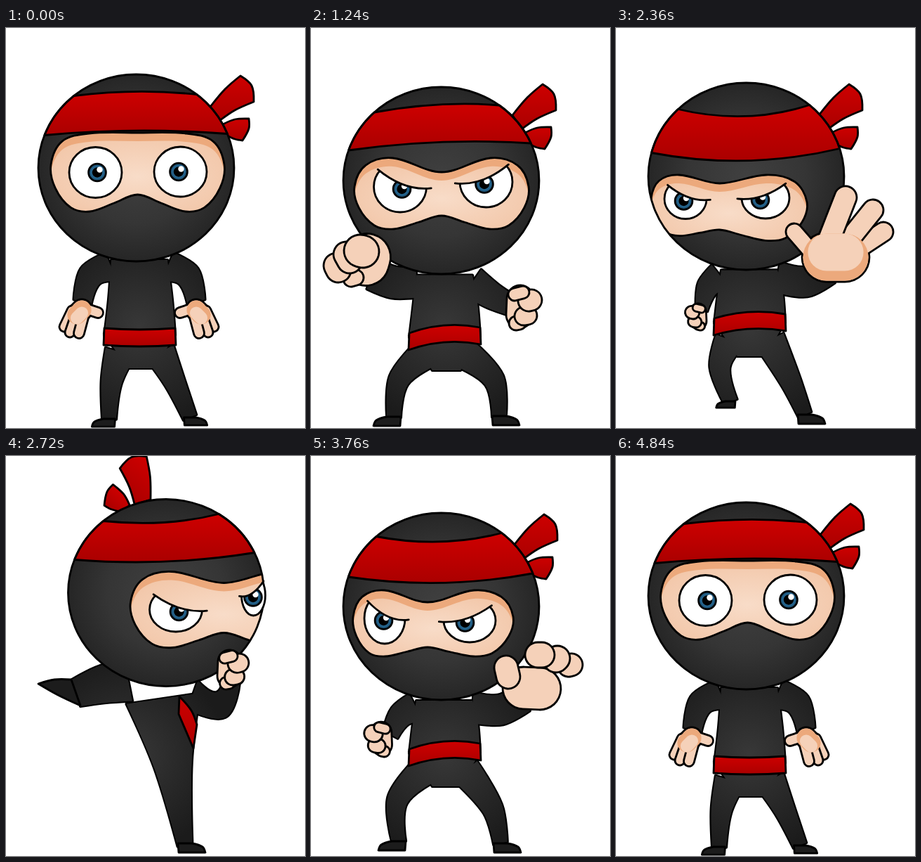
An HTML page that plays this animation: 426 px wide and 569 px high, repeating every 6000 ms.

```html
<!DOCTYPE html>
<html lang="en">
<head>
<meta charset="utf-8">
<title>Ninja moves</title>
<style>
html, body { margin: 0; width: 100%; height: 100%; overflow: hidden; background: #fff; }
svg { display: block; width: 100%; height: 100%; stroke-linejoin: round; stroke-linecap: round; }
.ink { stroke: #000; stroke-width: 2.8; vector-effect: non-scaling-stroke; }
</style>
</head>
<body>
<svg viewBox="0 0 426 569">
  <defs>
    <radialGradient id="hood" cx=".5" cy=".5" r=".6"><stop offset="0" stop-color="#404040"/><stop offset=".5" stop-color="#353535"/><stop offset="1" stop-color="#1e1e1e"/></radialGradient>
    <radialGradient id="suit" gradientUnits="userSpaceOnUse" cx="190" cy="425" r="140"><stop offset="0" stop-color="#383838"/><stop offset="1" stop-color="#1b1b1b"/></radialGradient>
    <linearGradient id="red" x2="0" y2="1"><stop offset="0" stop-color="#ce0000"/><stop offset="1" stop-color="#aa0000"/></linearGradient>
    <radialGradient id="skin" cx=".5" cy=".45" r=".6"><stop offset="0" stop-color="#f8dcc8"/><stop offset="1" stop-color="#f2c6a8"/></radialGradient>
    <radialGradient id="iris"><stop offset=".4" stop-color="#2f77a5"/><stop offset="1" stop-color="#174a6c"/></radialGradient>
    <clipPath id="skullClip"><ellipse cx="185.5" cy="199" rx="139.5" ry="133"/></clipPath>
  </defs>
  <g id="stage"></g>
</svg>
<script>
const SUIT = 'url(#suit)', RED = 'url(#red)', SKIN = '#f5d1b9', SHADE = '#eca97c';

// Closed curve through [x, y, corner] points.
function curve(points) {
  const n = points.length, at = i => points[(i + n) % n];
  const handle = (i, len) => {
    const a = at(i - 1), b = at(i + 1), k = len / (Math.hypot(b[0] - a[0], b[1] - a[1]) || 1);
    return [(b[0] - a[0]) * k, (b[1] - a[1]) * k];
  };
  let d = 'M' + at(0).slice(0, 2);
  for (let i = 0; i < n; i++) {
    const a = at(i), b = at(i + 1), len = Math.hypot(b[0] - a[0], b[1] - a[1]) / 3;
    const ta = a[2] ? [0, 0] : handle(i, len), tb = b[2] ? [0, 0] : handle(i + 1, len);
    d += `C${a[0] + ta[0]} ${a[1] + ta[1]} ${b[0] - tb[0]} ${b[1] - tb[1]} ${b[0]} ${b[1]}`;
  }
  return d + 'Z';
}
// "x,y" is smooth, "!x,y" a corner.
const outline = s => curve(s.split(' ').map(p => [...p.replace('!', '').split(',').map(Number), p[0] === '!']));

const shape = (d, fill) => `<path class="ink" fill="${fill}" d="${d}"/>`;
const group = (transform, inner) => `<g transform="${transform}">${inner}</g>`;
const clip = (id, inner) => `<g clip-path="url(#${id})">${inner}</g>`;
const ellipse = (x, y, rx, ry, attrs) => `<ellipse cx="${x}" cy="${y}" rx="${rx}" ry="${ry}" ${attrs}/>`;

function mix(a, b, k) {
  if (typeof a === 'number') return a + (b - a) * k;
  if (Array.isArray(a)) return typeof a[0] === 'string' && a[0] !== b[0] ? (k < 0.5 ? a : b) : a.map((v, i) => mix(v, b[i], k));
  if (typeof a === 'object') return Object.fromEntries(Object.keys(a).map(key => [key, mix(a[key], b[key], k)]));
  return k < 0.5 ? a : b;
}

// Tapered tube along [x, y, width] joints.
function limb(...joints) {
  const rail = side => joints.map(([x, y, w], i) => {
    const a = joints[Math.max(i - 1, 0)], b = joints[Math.min(i + 1, joints.length - 1)];
    const dx = b[0] - a[0], dy = b[1] - a[1], k = side * w / 2 / Math.hypot(dx, dy);
    return [x - dy * k, y + dx * k, i === 0 || i === joints.length - 1];
  });
  return curve([...rail(1), ...rail(-1).reverse()]);
}
// Several shapes fused under one outline.
function fuse(parts) {
  const paths = parts.map(d => `<path d="${d}"/>`).join('');
  return `<g stroke="#000" stroke-width="4.2">${paths}</g><g fill="${SUIT}">${paths}</g>`;
}

// Head: features are placed on one skull ellipse.
const skull = { x: 185.5, y: 199, rx: 139.5, ry: 133 };
const skullEllipse = attrs => ellipse(skull.x, skull.y, skull.rx, skull.ry, attrs);
const rim = (y, side) => [skull.x + side * skull.rx * Math.sqrt(1 - ((y - skull.y) / skull.ry) ** 2), y];
const ribbons = ['!-6,-10 15,-35 !37,-54 53,-40 !56,-17 29,-5 !7,10', '!12,15 29,8 !49,7 49,21 !40,38 29,36 !16,30'].map(outline);

function headband([y, sag, tilt, h]) {
  const arc = `A${skull.rx} ${skull.ry} 0 0 `;
  const low = y + h;
  return `M${rim(y + tilt, -1)}Q${skull.x} ${y + 2 * sag} ${rim(y - tilt, 1)}` +
    `${arc}1 ${rim(low - tilt, 1)}Q${skull.x} ${low + 2.2 * sag} ${rim(low + tilt, -1)}${arc}1 ${rim(y + tilt, -1)}Z`;
}

function opening([cx, w, brow, dip, nose, cheek, turn, tilt]) {
  const h = cheek - brow, fn = (nose - brow) / h;
  const half = [[0, (dip - brow) / h], [.56, 0], [.87, .1], [1, .4], [.95, .7], [.77, .95], [.55, 1], [.27, (1 + fn) / 2], [0, fn]];
  const other = half.slice(1, -1).reverse().map(([u, f]) => [-u, f]);
  return curve([...half, ...other].map(([u, f]) => [cx + w * (u + turn * (1 - u * u)), brow + h * f + tilt * u * f]));
}

function eye(side, [x, y, rx, ry], gaze, frown) {
  const lift = (1 - frown) * ry, ix = x + gaze - side * 2.5, iy = y + 3 * frown;
  const x1 = x + side * rx * .85, y1 = y - ry * .69 - lift;
  const x2 = x - side * rx * 1.18, y2 = y + ry * .05 - lift;
  const lid = `M${x1} ${y1}Q${(x1 + x2) / 2} ${(y1 + y2) / 2 + ry * .5} ${x2} ${y2}`;
  const id = 'eye' + side;
  const under = `${lid}V${y + 90}H${x + side * 90}V${y1}Z`;
  const ball = ellipse(ix, iy, 12.4, 12.4, 'class="ink" fill="url(#iris)"') + ellipse(ix, iy, 7.2, 7.2, '') +
    ellipse(ix + 3.5, iy - 4, 4.2, 4.2, 'fill="#fff"');
  return `<clipPath id="${id}">${ellipse(x, y, rx, ry, '')}</clipPath><clipPath id="${id}lid"><path d="${under}"/></clipPath>` +
    clip(id + 'lid', ellipse(x, y, rx, ry, 'fill="#fff"') + clip(id, ball) + ellipse(x, y, rx, ry, 'class="ink" fill="none"')) +
    (frown > .2 ? shape(lid, 'none') : '');
}

function headOf([x, y], look) {
  const face = opening(look.face), [kx, ky, turn, flip] = look.knot;
  const skin = `<path d="${face}" fill="${SHADE}"/><clipPath id="faceClip"><path d="${face}"/></clipPath>` +
    clip('faceClip', group('translate(0 12)', `<path d="${face}" fill="url(#skin)"/>`)) + shape(face, 'none');
  return group(`translate(${x} ${y})`,
    group(`translate(${kx} ${ky}) rotate(${turn}) scale(1 ${flip})`, ribbons.map(d => shape(d, RED)).reverse().join('')) +
    skullEllipse('fill="url(#hood)"') + shape(headband(look.band), RED) + clip('skullClip', skin) +
    skullEllipse('class="ink" fill="none"') +
    eye(-1, look.left, look.gaze, look.frown) + eye(1, look.right, look.gaze, look.frown));
}

// band: y, sag, tilt, height; face: centre, half width, brow, dip, nose, cheek, turn, tilt; eyes: centre, radii.
const calm = {
  knot: [297, 122, 0, 1], band: [95.5, -5, 1, 56], face: [187.5, 123.5, 150, 149, 237, 261, 0, 0],
  left: [127.5, 205.5, 37.5, 36], right: [248.5, 204.5, 37.5, 35.5], gaze: 0, frown: 0
};
const angry = {
  knot: [293, 116, 0, 1], band: [97, -6, 5, 54], face: [186, 124, 167, 187, 249, 268, 0, 0],
  left: [127, 208, 37.5, 36], right: [249.5, 201, 37.5, 36], gaze: 0, frown: 1
};
const turned = {
  knot: [295, 122, 0, 1], band: [97, 10, 2.5, 57.5], face: [174, 114, 176, 193, 257, 270, -.07, 0],
  left: [105, 216, 29, 36], right: [226, 219, 37, 31], gaze: -4, frown: 1
};
const bowed = {
  knot: [295, 122, 0, 1], band: [100.5, 13, 3, 62], face: [161, 111, 197, 209, 275, 287, -.12, 6],
  left: [99, 231, 30, 28.5], right: [213, 229.5, 34, 29.5], gaze: -5, frown: 1
};
const aside = {
  knot: [152.5, 70.5, -141, -1], band: [92, 7, 5, 55], face: [268, 133, 169, 185, 256, 277, 0, 0],
  left: [199.5, 223, 37.5, 31.5], right: [310, 202.5, 17, 29], gaze: 2, frown: 1
};

// Hands: a palm and fingers, each a capsule of x1, y1, x2, y2, width.
const hands = {
  open: { side: -1, cover: -9, palm: [0, -13, -7, -6, 30],
    fingers: [[-14, -12, -25, 11, 14], [-7, -10, -17, 19, 14], [4, -10, -4, 20, 15], [8, -14, 23, -9, 15]] },
  fist: { side: -1, palm: [14, -4, 12, 3, 67],
    fingers: [[-9, 27, -2, 25, 22], [-30, 8, -27, 14, 36], [-16, -8, -11, 1, 36], [4, -13, 8, -12, 46]] },
  small: { side: 1, palm: [-5, -13, -6, 10, 38],
    fingers: [[-11, 22, -6, 21, 20], [0, 12, 6, 11, 26], [7, -10, 11, -11, 30], [-13, -19, -1, -22, 18]] },
  palm: { side: 1, cover: 14, palm: [-18, 31, 8, 31, 70],
    fingers: [[25, 20, 63, -5, 28], [7, 15, 48, -36, 30], [-18, 15, 9, -54, 32], [-38, 25, -64, -5, 24]] },
  bent: { side: 1, palm: [-20, 18, 3, 19, 60],
    fingers: [[44, -14, 48, -15, 32], [26, -22, 28, -24, 36], [0, -29, 6, -29, 36], [-45, -11, -42, 2, 34]] }
};
function handOf([kind, x, y, size], side) {
  const { side: own, cover, palm, fingers } = hands[kind], edge = 2.8 / size;
  const capsule = ([x1, y1, x2, y2, w], color, grow, dy = 0) =>
    `<path d="M${x1} ${y1 + dy}L${x2} ${y2 + dy}" stroke="${color}" stroke-width="${w + grow}"/>`;
  const inked = c => capsule(c, '#000', edge) + capsule(c, SKIN, -edge);
  const top = cover ? capsule(palm, SHADE, -edge) + capsule(palm, SKIN, -edge - Math.abs(cover), -cover / 2) : '';
  return group(`translate(${x} ${y}) scale(${size * own * side} ${size})`, inked(palm) + fingers.map(inked).join('') + top);
}

// Body: head offset, belt (y, tilt, sag), arms (elbow, wrist, width), legs (knee, ankle, foot size).
const footShape = outline('!-10,0 -25,5 !-29,13 !9,13 !10,0');
const foot = (side, [, , x, y, size]) => group(`translate(${x} ${y}) scale(${-side * size} ${size})`, shape(footShape, '#1c1c1c'));

function front(p) {
  const [y, tilt, sag] = p.belt, chest = 340 + p.head[1] * 1.2;
  const arm = (side, [ex, ey, wx, wy, w]) => limb([190 + side * 40, chest, 44], [ex, ey, 22 + w / 2], [wx, wy, w]);
  const leg = (side, [kx, ky, ax, ay]) => limb([191 + side * 28, y + 34, 44], [kx, ky, 29], [ax, ay, 20]);
  const torso = curve([[150, chest - 10, 1], [146, y - 40], [140, y + 10, 1], [241, y + 10, 1], [237, y - 40], [230, chest - 10, 1]]);
  const hips = curve([[140, y + 8, 1], [241, y + 8, 1], [213, y + 57, 1], [173, y + 57, 1]]);
  const belt = `M140 ${y + tilt}Q190 ${y + 2 * sag} 241 ${y - tilt}L242 ${y + 24 - tilt}Q190 ${y + 24 + 2 * sag} 139 ${y + 24 + tilt}Z`;
  return fuse([leg(-1, p.legL), leg(1, p.legR), hips, arm(-1, p.armL), arm(1, p.armR), torso]) +
    foot(-1, p.legL) + foot(1, p.legR) + shape(belt, RED) + headOf(p.head, p.look) + handOf(p.left, -1) + handOf(p.right, 1);
}

const stand = {
  head: [0, 0], look: calm, belt: [427, 0, 2],
  armL: [120, 353, 109, 390, 26], armR: [260, 353, 271, 390, 26],
  legL: [150, 505, 147, 556, .85], legR: [241, 505, 262, 554, .85],
  left: ['open', 108, 414, 1], right: ['open', 271, 414, 1]
};
const jabLeft = {
  head: [0, 18], look: angry, belt: [430, 4, -7],
  armL: [118, 362, 88, 350, 46], armR: [258, 381, 284, 394, 30],
  legL: [125, 501, 118, 553, 1], legR: [261, 501, 268, 552, 1],
  left: ['fist', 66, 330, 1], right: ['small', 303, 398, 1]
};
const jabRight = {
  ...jabLeft, head: [-2, 22],
  armL: [120, 380, 101, 394, 34], armR: [270, 361, 302, 344, 42],
  left: ['small', 80, 396, 1], right: ['fist', 316, 328, .92]
};
const claw = {
  head: [0, 15], look: turned, belt: [413, 4, -7],
  armL: [127, 370, 113, 396, 24], armR: jabRight.armR,
  legL: [123, 490, 125, 548, 1], legR: [259, 502, 270, 551, 1],
  left: ['small', 96, 403, .78], right: ['bent', 323, 312, 1]
};
const block = {
  head: [0, 12], look: bowed, belt: [410, 3, -6],
  armL: [130, 370, 122, 401, 17], armR: jabRight.armR,
  legL: [148, 483, 163, 531, .7], legR: [249, 503, 269, 550, 1],
  left: ['small', 114, 411, .6], right: ['palm', 318, 295, 1]
};
const ready = { ...jabRight, head: [-1, 24], right: ['fist', 322, 329, .92] };
const punchLeft = { ...jabLeft, head: [-1, 21], left: ['fist', 49, 330, 1] };
const punchRight = { ...jabRight, head: [0, 19], right: ['fist', 326, 327, 1] };

// Side view for the kick.
const sash = outline('!263,342 280,362 !288,382 !283,416 !262,367');
const toe = outline('!-7,-19 -31,-19 !-54,-13 -26,3 !6,18');
const chamber = { leg: [[190, 318, 62], [150, 326, 52], [116, 337, 40]], toe: 'translate(116 337)' };
const kick = { leg: [[250, 362, 70], [330, 362, 50], [394, 347, 37]], toe: 'translate(394 347) rotate(-35) scale(-.85 .85)' };

const side = (p, x = 0) => group(`translate(${x} 0)`,
  fuse([limb(...p.leg), limb([240, 345, 106], [254, 440, 54], [271, 554, 21]), limb([282, 340, 44], [322, 354, 38], [338, 318, 24])]) +
  group(p.toe, shape(toe, '#1c1c1c')) + foot(1, [0, 0, 271, 551, 1]) + shape(sash, RED) +
  headOf([58.5, -4.5], aside) + handOf(['small', 339, 304, .88], 1));

// Every move advances one drawing per 80 ms, then holds.
const pose = p => () => front(p);
const blend = (a, b, k) => pose(mix(a, b, k));
const toClaw = [.35, .7, 1].map(k => blend(ready, claw, k));
const sway = blend(block, claw, .3), wind = () => side(chamber, -16), coil = () => side(chamber);
const moves = [
  [0, pose(stand)],
  [360, blend(stand, ready, .5), pose(ready)],
  [600, blend(ready, punchLeft, .5), pose(punchLeft)],
  [840, pose(jabLeft), pose(jabRight), pose(punchRight)],
  [1160, pose(jabRight), pose(jabLeft), pose(punchLeft)],
  [1760, pose(jabRight), pose(ready)],
  [2120, ...toClaw, pose(block)],
  [2640, sway, wind, coil, () => side(kick)],
  [3160, coil, wind, sway, pose(block)],
  [3760, ...[...toClaw].reverse(), pose(ready)],
  [4760, blend(ready, stand, .5), pose(stand)]
];
const steps = moves.flatMap(([at, ...draws]) => draws.map((draw, i) => ({ at: at + i * 80, draw })));

const stage = document.getElementById('stage');
const start = performance.now();
let shown;
function tick() {
  const t = (performance.now() - start) % 6000;
  const step = steps.findLast(s => s.at <= t);
  if (step !== shown) {
    stage.innerHTML = step.draw();
    shown = step;
  }
  requestAnimationFrame(tick);
}
tick();
</script>
</body>
</html>
```
